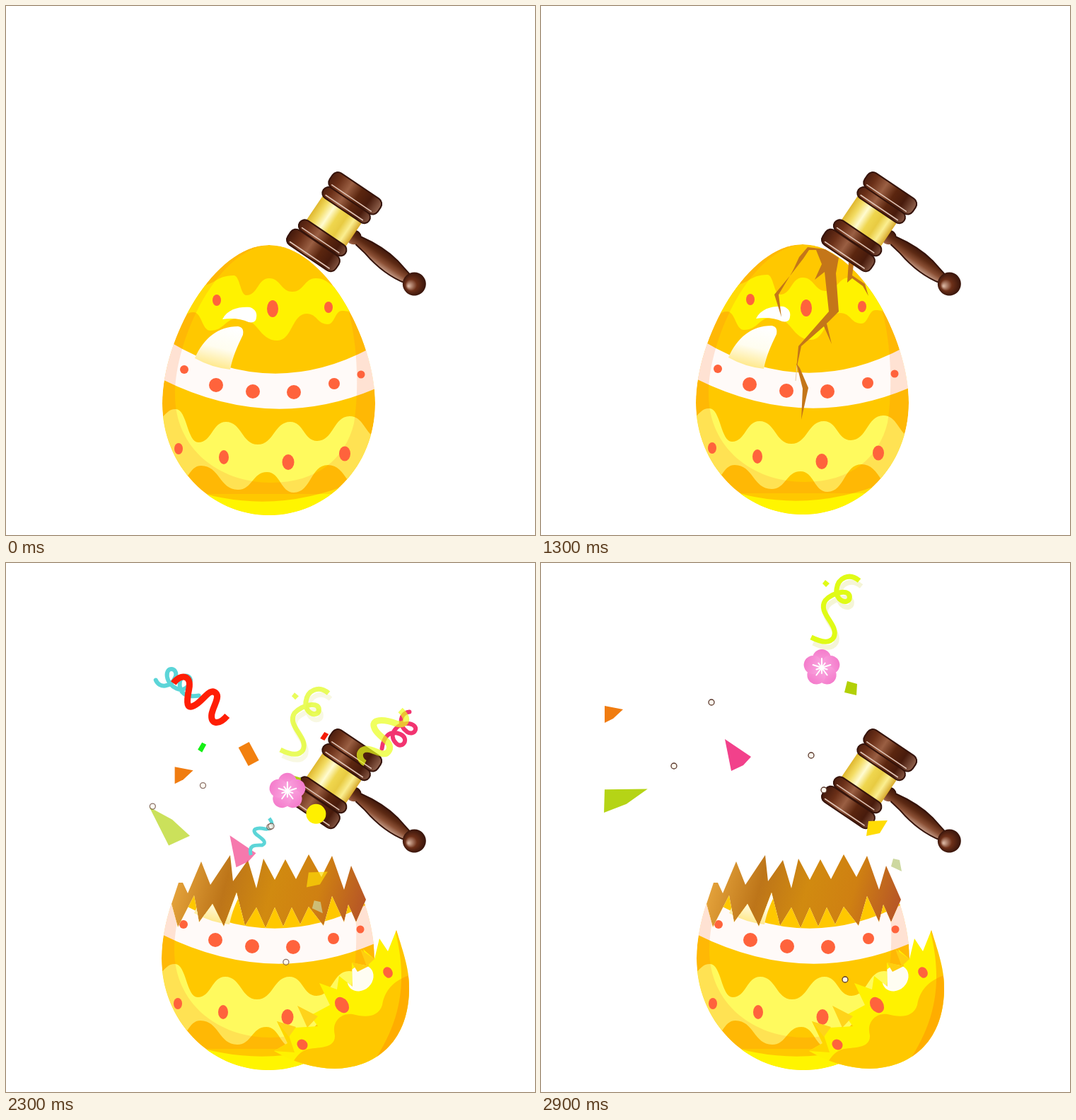
These frames come from a looping animation (748x748 px, 3000 ms). An HTML page with a canvas:

```html
<!DOCTYPE html>
<html>
<head>
<meta charset="utf-8">
<style>
html, body { margin: 0; width: 100%; height: 100%; overflow: hidden; background: #fff; }
canvas { display: block; width: 748px; height: 748px; }
</style>
</head>
<body>
<canvas id="stage" width="748" height="748"></canvas>
<script>
const c = document.getElementById('stage').getContext('2d');

const fill = (path, color, rule) => { c.fillStyle = color; c.fill(new Path2D(path), rule || 'nonzero'); };
const stroke = (path, color, width, cap = 'butt') => {
  c.strokeStyle = color; c.lineWidth = width; c.lineCap = cap; c.lineJoin = 'round';
  c.stroke(new Path2D(path));
};
function oval(x, y, rx, ry = rx, color = '#ff633c', turn = 0) {
  c.fillStyle = color;
  c.beginPath(); c.ellipse(x, y, rx, ry, turn, 0, 7); c.fill();
}
function ramp(x0, y0, x1, y1, ...stops) {
  const g = c.createLinearGradient(x0, y0, x1, y1);
  stops.forEach((s, i) => g.addColorStop(i / (stops.length - 1), s));
  return g;
}
function at(x, y, degrees, draw) {
  c.save(); c.translate(x, y); c.rotate(degrees * Math.PI / 180); draw(); c.restore();
}
// Wavy edge through its extremes, with level tangents
function wave(text) {
  const p = text.split(' ').map(s => s.split(',').map(Number));
  return p.slice(1).map(([x, y], i) => {
    const [px, py] = p[i], m = (px + x) / 2;
    return `C${m},${py} ${m},${y} ${x},${y}`;
  }).join('');
}

const EGG = 'M372 338C450 338 522 470 522 562C522 650 455 720 372 720C289 720 221 650 221 562C221 470 294 338 372 338Z';
const INNER = 'M375 338C300 340 239 470 239 550C239 625 300 674 375 674C440 674 480 640 492 590C500 540 500 440 462 375C440 345 400 338 375 338Z';
const TOP_BAND = 'M270 396' + wave('270,396 322,381 340,409 372,385 405,404 438,385 480,402') +
  'L510 440' + wave('510,440 475,431 455,450 425,435 384,473 330,441 289,459 265,433 245,440') + 'Z';
const LOW_BAND = 'M210 585' + wave('210,585 240,570 272,617 311,588 356,620 402,588 440,615 486,580 530,612') +
  'L510 690' + wave('510,690 455,649 407,688 369,659 328,684 276,650 240,676') + 'Z';

function egg(dx, dy) {
  c.save();
  c.translate(dx, dy);
  c.clip(new Path2D(EGG));
  fill(EGG, '#ffc800');
  fill(TOP_BAND, '#fff200');
  fill('M230 474Q372 560 515 484L525 540Q372 606 215 525Z', '#fffaf8');
  fill(LOW_BAND, '#fffa5e');
  fill('M250 680Q372 725 495 672V730H250Z', '#fff500');
  c.save();
  c.clip(new Path2D('M0 0H748V690H0Z'));
  fill(EGG + INNER, 'rgba(255,110,30,.17)', 'evenodd');
  c.restore();
  oval(298, 416, 6, 8); oval(377, 428, 8, 12); oval(456, 426, 6, 8);
  oval(252, 514, 6); oval(297, 536, 10); oval(349, 545, 10);
  oval(407, 546, 10); oval(464, 534, 8); oval(502, 521, 5.5);
  oval(244, 626, 6, 8); oval(308, 638, 7, 10); oval(399, 645, 8.5, 11); oval(479, 633, 8, 10.5);
  fill('M306 443C314 428 330 425 345 426Q356 430 354 441Q353 449 343 447Q327 440 306 443Z', '#fff');
  fill('M267 498C279 470 300 453 328 453Q337 454 335 465C327 482 321 494 317 514Q290 511 267 498Z',
    ramp(310, 453, 295, 514, '#fff', '#fffdf0', '#ffe680'));
  c.restore();
}

function cracks(more) {
  const brown = '#c47619';
  fill('M377 341L402 344L421 356L417 378L421 432L404 449L411 478L400 453L368 481L361 514L364 481L407 432L401 376L387 387L397 365L389 345L379 345L371 357L354 379L365 355Z', brown);
  fill('M435 362L442 366L440 381L458 393L463 410L455 396L440 385L433 391Z', brown);
  stroke('M362 508L360 530', '#e8c9a0', 1);
  if (more) {
    fill('M361 505L366 512L378 540L368 585L370 541Z', brown);
    fill('M354 379L366 358L336 408L340 440L330 408Z', brown);
  }
}

const RIM = 'L243 515L266 470L273 508L292 482L308 514L326 466L338 513L354 487L367 516L380 487L392 514L404 487L416 511L428 486L449 513L461 471L478 508L484 483L495 508L509 476';
const BACK = 'L488 428L478 462L461 414L446 444L428 412L410 447L395 419L380 448L364 418L354 460L342 420L321 450L317 413L289 455L276 422L257 467L250 452L244 452Z';
const CAP = 'M552 519C562 552 571 575 570 605C568 680 520 714 465 715Q420 714 379 690L398 679L383 648L409 657L441 655L430 640L458 625L443 594L468 603L471 584L490 599L489 565L513 570L505 546L521 560L528 531L540 549Z';

function brokenEgg() {
  fill('M234 482' + RIM + BACK, ramp(250, 430, 500, 500, '#e2a039', '#bd7519', '#d18a10', '#cf8012', '#b75726'));
  c.save();
  c.clip(new Path2D('M200 474L234 482' + RIM + 'L540 470V730H200Z'));
  egg(-1, -3);
  c.restore();

  fill(CAP, '#fff200');
  c.save();
  c.clip(new Path2D(CAP));
  fill('M580 580C550 588 536 602 532 625C526 644 506 642 490 638C474 636 460 648 465 668C466 688 440 684 425 688Q408 694 400 720H580Z', '#ffc800');
  fill('M545 500C572 590 560 650 510 720H590V500Z', 'rgba(255,140,0,.45)');
  oval(501, 587, 17, 20, '#fffdf2', .8);
  fill('M379 690L398 679L383 648L400 668L408 692Z', '#ffd500');
  c.restore();
  fill('M489 565L513 570L497 578ZM501 546L521 560L510 570Z', '#ffce10');
  fill('M412 626L441 641L426 657ZM383 648L410 656L400 670Z', '#ffd31a');
  oval(540, 579, 6.5, 8, undefined, -.5);
  oval(475, 625, 9, 12, undefined, -.6);
  oval(419, 681, 7, 8, undefined, -.8);
}

function box(x, y, w, h, r, color, line) {
  c.beginPath(); c.roundRect(x, y, w, h, r);
  c.fillStyle = color; c.fill();
  if (line) { c.strokeStyle = line; c.lineWidth = 2; c.stroke(); }
}

function hammer(lift) {
  c.save();
  c.translate(577 + 11 * lift, 393 - 15 * lift);
  c.rotate(lift * .35);
  c.translate(-577, -393);
  at(463, 305, 34, () => {
    const dark = '#35130a';
    const wood = ramp(-42, 0, 42, 0, '#43190c', '#6b3018', '#9a5f43', '#5b260f', '#481b0c', '#8a5c48');
    fill('M33 -7Q40 -9 44 -4C66 -8 84 -9 106 -5L134 2V15C108 21 84 18 62 12L44 9Q38 14 33 12Z',
      ramp(0, -8, 0, 18, '#3f170b', '#5d2a14', '#8b5035', '#c49c88'));
    stroke('M33 -7Q40 -9 44 -4C66 -8 84 -9 106 -5L134 2M134 15C108 21 84 18 62 12L44 9', dark, 2);
    const knob = c.createRadialGradient(139, 16, 1, 144, 9, 17);
    knob.addColorStop(0, '#d5b09c'); knob.addColorStop(.45, '#6d3019'); knob.addColorStop(1, dark);
    oval(144, 9, 16.5, 16.5, knob);
    box(-33, -22, 67, 43, 2, ramp(-33, 0, 34, 0, '#dfb72e', '#f3dc63', '#fffbd0', '#efd64e', '#e8cb42', '#fbee90', '#d8aa2c'));
    box(-31, -41, 66, 84, 0, 'transparent');
    for (const [y, h, x, w] of [[-38, 17, -37, 78], [19, 17, -39, 78], [-63, 25, -38, 82], [37, 25, -42, 82]]) {
      box(x, y, w, h, 9, wood, dark);
      stroke(`M${x + 7} ${y + h - 4}H${x + w - 8}`, '#dfc3b5', 1.6, 'round');
    }
  });
  c.restore();
}

// Confetti shapes, drawn around their own anchor
const LOOPS = 'M-30 -3C-25 9 -8 8 -2 -8C2 -20 -16 -24 -14 -8C-12 7 9 19 18 2C24 -9 6 -15 4 0C2 16 14 22 31 19';
const RIBBON = 'M-38 -24C-28 -38 -12 -36 -16 -16C-20 4 -20 15 -6 6C6 -2 14 -18 22 -10C28 -4 18 8 16 20C14 34 26 36 38 22';
const SNAKE = 'M26 -37C40 -24 34 -14 20 -18C4 -24 -18 -26 -10 -10C-4 2 16 8 10 20C4 32 -10 18 -22 18C-36 20 -32 34 -24 38';
const TWIST = 'M12 -26C20 -16 14 -10 6 -11C-6 -14 -14 -10 -6 -3C2 3 10 8 2 12C-6 12 -18 10 -14 26';
const CURL = 'M34 -42C20 -54 4 -46 2 -30C0 -14 16 -8 20 -16C24 -32 -4 -26 -14 -14C-26 4 6 20 -2 38C-8 48 -22 44 -34 38';

const line = (path, color, width, cap) => () => stroke(path, color, width, cap);
const flat = (path, color) => () => fill(path, color);
const ring = () => { oval(0, 0, 4, 4, '#fff8ee'); c.strokeStyle = '#5a382c'; c.lineWidth = 1.3; c.stroke(); };
function curl() {
  at(3, 8, 0, line(CURL, '#f5f5d6', 7));
  stroke(CURL, '#e0fb16', 7);
  fill('M-14 -43L-8 -38L-13 -33L-18 -38Z', '#e0fb16');
}
function flower() {
  for (let i = 0; i < 5; i++) at(0, 0, i * 72, () => oval(0, -13, 13, 13, ramp(0, -26, 0, 6, '#f47bcb', '#fbb0e4')));
  for (let i = 0; i < 10; i++) at(0, 0, i * 36, line(`M0 0V${i % 2 ? -8 : -13}`, '#fff', 2, 'round'));
  oval(0, 0, 3, 3, '#fff');
}

// Times in tenths of a second; keys are [time, x, y, degrees]
const pieces = [];
const add = (draw, from, to, fade, ...keys) => pieces.push({ draw, from, to, fade, keys });
const trio = (draw, from, fade, a, b, d) => add(draw, from, 30, fade, [20, ...a], [25, ...b], [29, ...d]);

add(line(LOOPS, '#f23470', 6, 'round'), 16, 26, 0, [16, 367, 515, 107], [20, 481, 323, 107], [25, 607, 210, 107]);
add(line(LOOPS, '#5cd5d8', 6, 'round'), 16, 26, 0, [16, 382, 508], [20, 309, 275], [25, 191, 130]);
add(flat('M-15 -9L0 -17L14 9L-1 17Z', '#f2800f'), 16, 26, 0, [16, 388, 556], [20, 364, 368], [25, 329, 225]);
add(flat('M0 -6L6 -3L0 6L-6 3Z', '#f51c08'), 16, 24, 0, [16, 354, 560], [20, 409, 380]);
add(line(RIBBON, '#ff1e05', 9), 17, 27, 0, [20, 331, 318], [25, 247, 128], [26, 236, 100]);
add(flat('M0 -7L6 -4L0 7L-6 3Z', '#14f014'), 17, 26, 0, [20, 330, 361], [25, 242, 194]);
add(line(SNAKE, '#eaff1c', 9), 17, 27, 1, [20, 475, 355], [25, 562, 190], [26, 575, 168]);
trio(flat('M0 0L26 5L12 18L0 24Z', '#f07c10'), 17, 0, [320, 377], [187, 246], [90, 202]);
trio(flat('M-1 -41L10 -6L12 28L-19 17Z', '#b5d416'), 17, 1, [312, 409, -120], [186, 356, 0], [112, 333, 72]);
trio(flat('M0 0L37 25L26 37L9 45Z', '#f2418b'), 17, 1, [357, 480], [294, 332], [260, 249]);
trio(flat('M0 1L27 0L16 18L-3 22Z', '#ffdc05'), 17, 1, [409, 487], [440, 408], [463, 364]);
trio(flat('M-5 -9L4 -7L7 9L-8 2Z', '#cdd8a0'), 17, 1, [398, 528], [465, 463], [503, 427]);
trio(flat('M-5 -10L9 -6L8 10L-9 6Z', '#b2d006'), 17, 0, [393, 395], [418, 260], [438, 177]);
trio(curl, 17, 1, [425, 333], [420, 165], [416, 67]);
add(line(TWIST, '#5cd5d8', 5), 17, 27, 0, [20, 368, 453], [25, 355, 343]);
trio(flower, 18, 0, [397, 442], [398, 255], [397, 148]);
add(() => oval(0, 0, 14, 14, '#fff000'), 17, 27, 0, [20, 412, 416], [25, 456, 314]);
trio(ring, 17, 1, [304, 395], [264, 269], [241, 197]);
trio(ring, 17, 1, [220, 383], [200, 322], [188, 287]);
trio(ring, 17, 1, [368, 425], [376, 339], [382, 272]);
trio(ring, 17, 1, [357, 408], [385, 352], [400, 321]);
trio(ring, 17, 1, [373, 547], [409, 574], [430, 589]);

// Polynomial through the keys gives the slowing flight
const along = (keys, t, i) => keys.reduce((sum, k) =>
  sum + (k[i] || 0) * keys.reduce((w, o) => o === k ? w : w * (t - o[0]) / (k[0] - o[0]), 1), 0);

function confetti(t) {
  for (const { draw, from, to, fade, keys } of pieces) {
    if (t < from || t >= to) continue;
    c.globalAlpha = fade ? Math.min(1, (t - 16) / 10) : 1;
    at(along(keys, t, 1), along(keys, t, 2), along(keys, t, 3), draw);
  }
  c.globalAlpha = 1;
}

const LIFTS = [0, .5, 1, .5, 0, .7];

function render() {
  const t = Math.floor(performance.now() % 3000 / 100);
  c.fillStyle = '#fff';
  c.fillRect(0, 0, 748, 748);
  if (t < 9) egg(0, 0);
  else if (t < 15) { egg(-2, -1); cracks(t >= 13); }
  else brokenEgg();
  hammer(LIFTS[t] || 0);
  confetti(t);
  requestAnimationFrame(render);
}
render();
</script>
</body>
</html>
```
